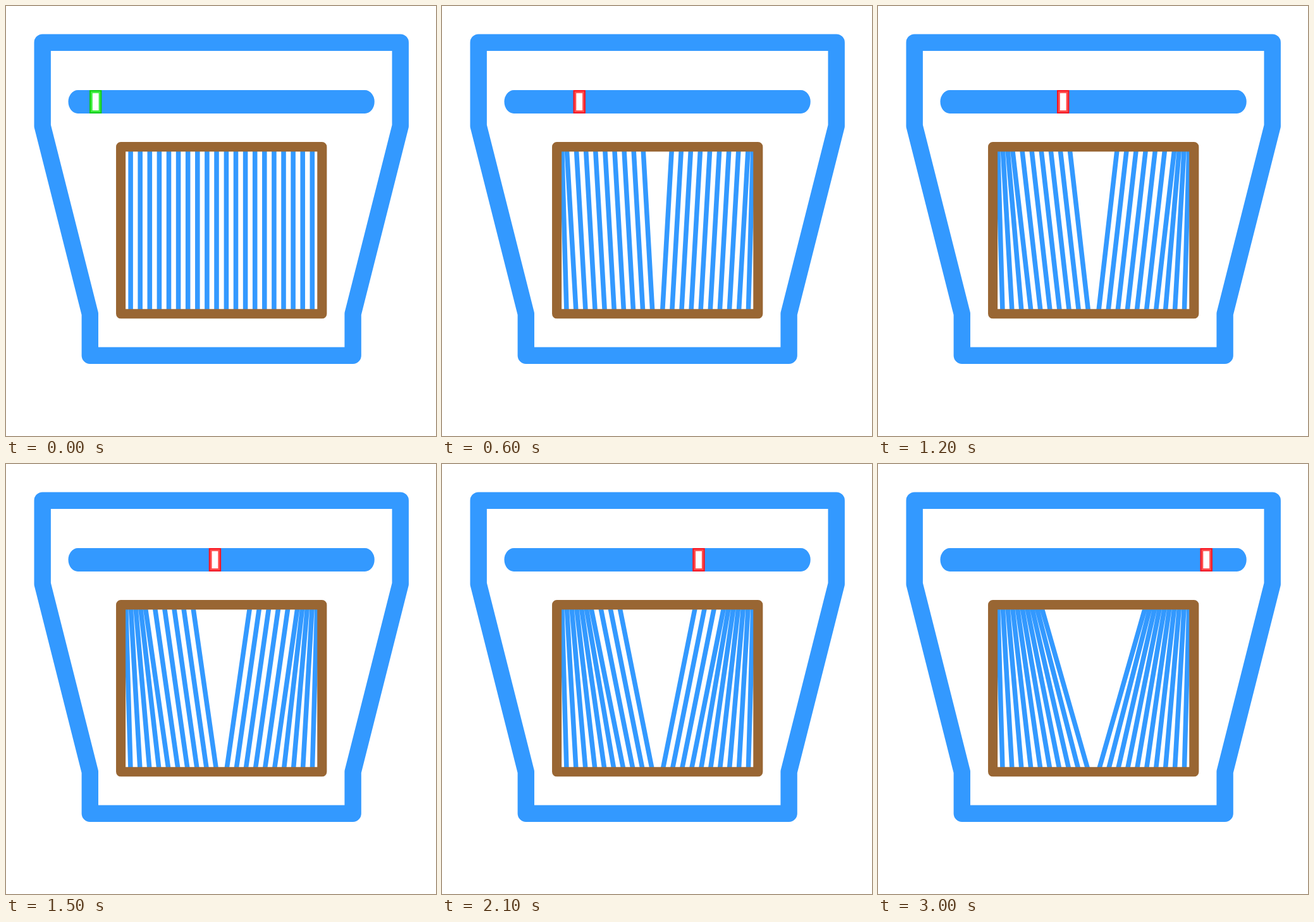
Recreate the animation shown at these times as an HTML page. Size 680 px wide and 680 px high, loop 3.3 s.

```html
<!DOCTYPE html>
<html lang="en">
<head>
<meta charset="utf-8">
<title>Slats</title>
<style>
  html, body { margin: 0; height: 100%; overflow: hidden; background: #fff; }
  svg { display: block; width: 680px; height: 680px; }
</style>
</head>
<body>
<svg viewBox="0 0 680 680" fill="none" stroke-linejoin="round">
  <path d="M57.7 57.7H623.7V189.7L548.6 486.8V552.7H132.8V486.8L57.7 189.7Z" stroke="#39f" stroke-width="26.4"/>
  <rect x="98.5" y="133" width="484.2" height="36.9" rx="15.1" ry="18.4" fill="#39f"/>
  <g id="thumb">
    <rect x="132" y="133" width="19.4" height="36.9" fill="currentColor"/>
    <rect id="inner" x="134" y="135" width="15.4" height="32.9"/>
    <rect x="136.8" y="137.8" width="9.8" height="27.3" fill="#fff"/>
  </g>
  <path id="slats" stroke="#39f" stroke-width="7.55"/>
  <use href="#slats" transform="matrix(-1 0 0 1 681.4 0)"/>
  <rect x="181.6" y="222.6" width="318.2" height="264.2" stroke="#963" stroke-width="15.1"/>
</svg>
<script>
  const STEP_MS = 300, STEPS = 11, HALF_GAP = 7.55;
  const [thumb, inner, slats] = ['thumb', 'inner', 'slats'].map(id => document.getElementById(id));

  function draw(step) {
    thumb.setAttribute('transform', `translate(${step * 37.75} 0)`);
    thumb.setAttribute('color', step ? '#f81420' : '#10cc18');
    inner.setAttribute('fill', step ? '#ff4d4d' : '#40ee40');

    // Each slat leans one half gap per step until it rests against its neighbour.
    let d = '';
    for (let i = 0; i < 10; i++) {
      const foot = 197.1 + 2 * HALF_GAP * i;
      const lean = HALF_GAP * Math.min(step, i + 1);
      d += `M${foot} 486.8L${foot - lean} 222.6`;
    }
    slats.setAttribute('d', d);
  }

  function tick() {
    draw(Math.floor(performance.now() / STEP_MS) % STEPS);
    requestAnimationFrame(tick);
  }
  tick();
</script>
</body>
</html>
```
